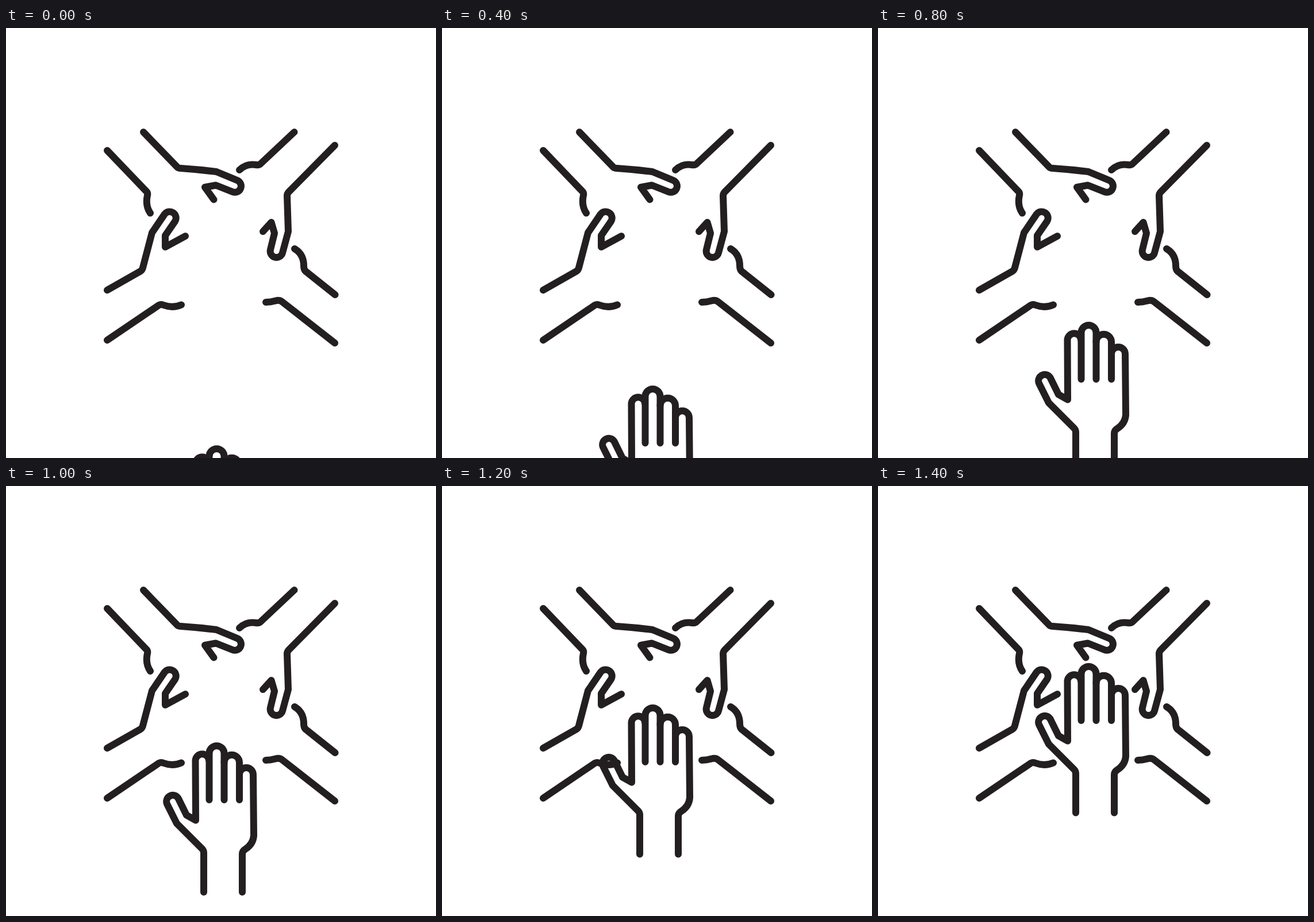
An HTML page for the animation above (1.7 s loop, 748 px wide and 748 px high).

```html
<!DOCTYPE html>
<html lang="en">
<head>
<meta charset="utf-8">
<title>Hands together</title>
<style>
  html, body { margin: 0; width: 100%; height: 100%; overflow: hidden; background: #fff; }
  svg { display: block; width: 100%; height: 100%; }
  path { fill: none; stroke: #231f20; stroke-width: 12; stroke-linecap: round; stroke-linejoin: round; }
</style>
</head>
<body>
<svg viewBox="0 0 748 748">
  <g id="arms">
    <path d="M239 181L298 242Q300 244 304 244Q335 246 366 250L402.2 265A10.8 10.8 0 0 1 394 285L365 273.500L346 277L361.500 298.500"/>
    <path d="M501.500 181L443 236Q440 239 435 238Q418 235 406 247"/>
    <path d="M572 204L492 285Q489 288 489 292L491 354L481 391A10.700 10.700 0 0 1 460 385.500L467 357L461.500 338L447 354"/>
    <path d="M502 384C514 391 518 402 518 414Q518 420 521 423L572.500 464"/>
    <path d="M452 477C462 477 467 475 471 474Q476 473 480 476L572 548"/>
    <path d="M176 543L266 482Q270 480 274 482Q290 488 305 481.500"/>
    <path d="M176 456L234 423Q237 421 238 417L254 356L275.800 324A11 11 0 0 1 294.200 336L277 361V381L312 362"/>
    <path d="M176 213L244 284Q247 287 246 291Q242 309 251 322"/>
  </g>
  <g id="hand">
    <path d="M344 568.500V500Q344 496 341 493L297 449L280 415A11 11 0 0 1 299.500 405L314 434.500L330 443.500L329.500 339A11.800 11.800 0 0 1 353 339"/>
    <path d="M353.500 408V327A12.800 12.800 0 0 1 379.500 327V408"/>
    <path d="M379.500 343A13.200 13.200 0 0 1 406 343V408"/>
    <path d="M406 364A12 12 0 0 1 430 364L431 470Q430 485 416 494Q411 497 411 502V568.500"/>
  </g>
</svg>
<script>
  const LOOP = 1700, STEP = 100;
  // [time in ms, distance below the resting place]
  const rise = [[0, 418], [400, 314], [600, 267], [800, 203], [1000, 138], [1200, 72], [1400, 0], [LOOP, 0]];

  const frames = rise.map(([t, y], i) => {
    const next = rise[i + 1] || [t + STEP];
    return {
      offset: t / LOOP,
      transform: `translateY(${y}px)`,
      easing: `steps(${(next[0] - t) / STEP}, end)`
    };
  });
  document.getElementById('hand').animate(frames, { duration: LOOP, iterations: Infinity });
</script>
</body>
</html>
```
